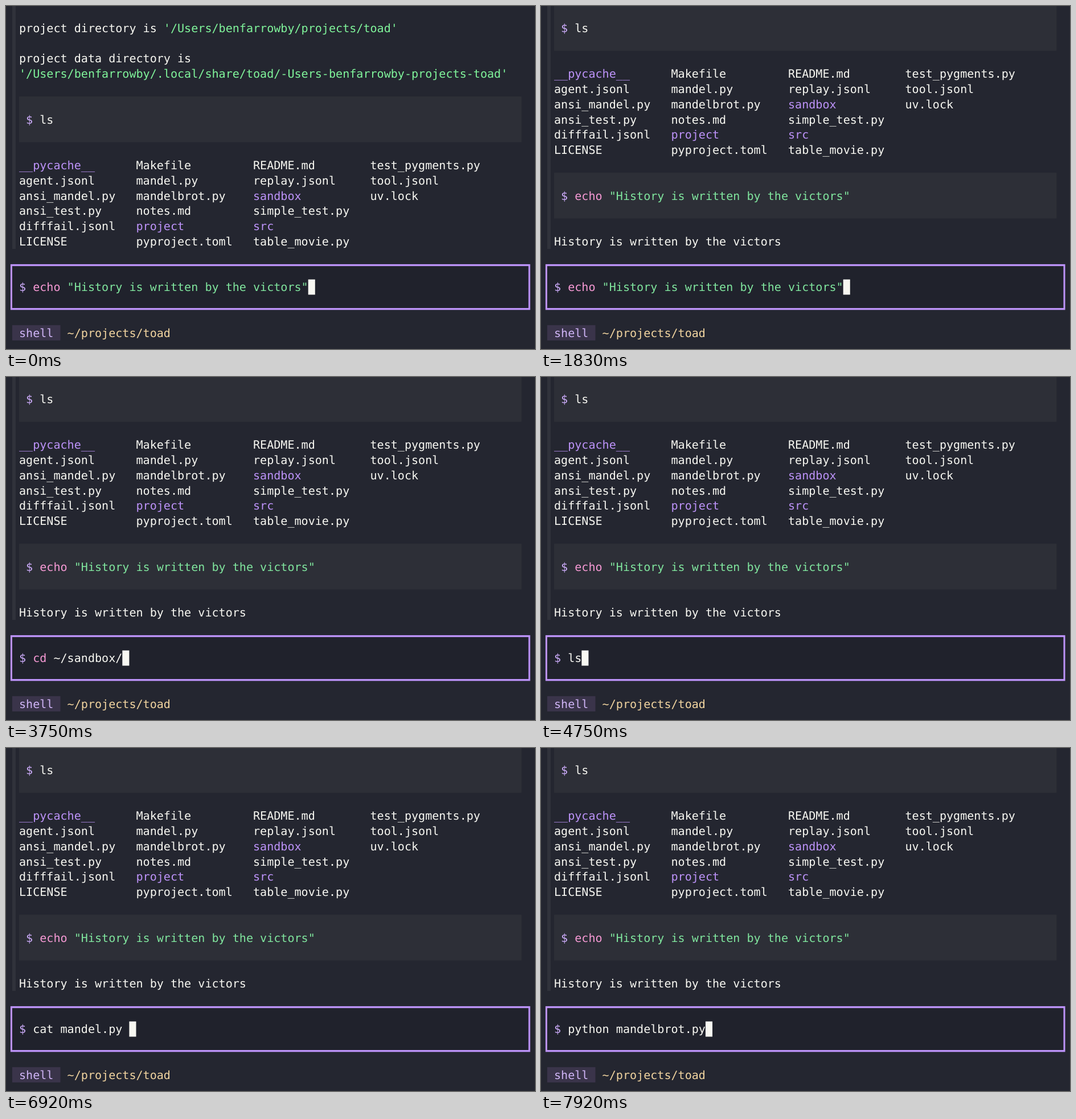
An HTML page with a canvas that plays this animation: 929 by 603 pixels, repeating every 8 s.

```html
<!DOCTYPE html>
<html lang="en">
<head>
<meta charset="utf-8">
<title>Shell history</title>
<style>
  html, body { margin: 0; width: 100%; height: 100%; overflow: hidden; background: #242630; }
  canvas { display: block; }
</style>
</head>
<body>
<canvas id="stage" width="929" height="603"></canvas>
<script>
const ctx = document.getElementById('stage').getContext('2d');
const LOOP = 8000;
const CELL = 12.088, ROW = 26.8, LEFT = 23, TOP = -1.7, BASELINE = 20.7;
const FONT = '20.08px "DejaVu Sans Mono", "Noto Sans Mono", monospace';
const C = {
  bg: '#242630', panel: '#2d2f37', bar: '#30323b', input: '#20222c',
  text: '#f8f8f2', purple: '#bd93f9', prompt: '#cdacfa', pink: '#f79ad5',
  path: '#80f59b', string: '#80e69e', yellow: '#f2d5a0', chevron: '#b9b4c8',
  tag: '#3a344a', tagText: '#d0b5f7', grey: '#7c7d82', blue: '#6474a8'
};
const USER = 'benfarrowby';
const ECHO = 'echo "History is written by the victors"';
const FIND = 'find . -name "*.py" -not -path "./sandbox*" | xargs wc -l';

const FILES = [
  ['__pycache__', 'agent.jsonl', 'ansi_mandel.py', 'ansi_test.py', 'difffail.jsonl', 'LICENSE'],
  ['Makefile', 'mandel.py', 'mandelbrot.py', 'notes.md', 'project', 'pyproject.toml'],
  ['README.md', 'replay.jsonl', 'sandbox', 'simple_test.py', 'src', 'table_movie.py'],
  ['test_pygments.py', 'tool.jsonl', 'uv.lock']
];
const FOLDERS = new Set(['__pycache__', 'project', 'sandbox', 'src']);

// Start time and prompt contents; null is the empty prompt.
const HISTORY = [
  [0, ECHO], [750, null], [1830, ECHO],
  [2670, 'python ansi_mandel.py'], [3500, 'python ansi_mandel.py '],
  [3750, 'cd ~/sandbox/'], [3920, 'ls'], [4080, 'python mandelbrot.py'],
  [4250, 'python simple_test.py'], [4500, 'ls -al'], [4580, 'cd ..'],
  [4750, 'ls'], [4830, FIND], [5000, 'python mandel.py'],
  [5170, 'ls'], [5330, 'python ansi_test.py'], [5750, 'ls'],
  [6000, 'ls -al'], [6170, 'python ansi_test.py'], [6500, 'ls'],
  [6580, 'python mandelbrot.py'], [6670, 'python ansi_mandel.py'],
  [6750, 'ls'], [6830, 'cat mandel.py'], [6920, 'cat mandel.py '],
  [7000, 'python mandel.py'], [7080, 'ls'], [7170, 'python ansi_mandel.py'],
  [7250, 'python mandelbrot.py'], [7330, 'ls'], [7500, 'python ansi_mandel.py'],
  [7580, 'python mandel.py'], [7670, 'ls'], [7920, 'python mandelbrot.py']
];
const CURSOR_OFF = [[420, 750], [2420, 2670], [3170, 3500]];

const colX = col => LEFT + col * CELL;
const rowY = row => TOP + row * ROW;

// Fills a block measured in terminal cells.
function block(col, row, cols, rows, color) {
  ctx.fillStyle = color;
  ctx.fillRect(colX(col), rowY(row), cols * CELL, rows * ROW);
}

function write(text, col, row, color) {
  ctx.fillStyle = color;
  ctx.fillText(text, colX(col), rowY(row) + BASELINE);
}

function writeCommand(command, col, row) {
  for (const { 0: part, index } of command.matchAll(/"[^"]*"|\S+/g)) {
    const color = part[0] === '"' ? C.string
      : /^(echo|cd)$/.test(part) ? C.pink : C.text;
    write(part, col + index, row, color);
  }
}

const panel = row => block(0, row, 73, 3, C.panel);

function drawLog(t) {
  const shift = t < 750 ? 0 : t < 830 ? 4 : t < 920 ? 5 : 6;
  ctx.save();
  ctx.beginPath();
  ctx.rect(0, 0, 929, rowY(16));
  ctx.clip();
  block(-1, 0, 0.5, 16, C.bar);
  // Panel backgrounds repaint one step after the text.
  if (t < 830) panel(6);
  else {
    panel(6 - shift);
    panel(17 - shift);
  }

  write('project directory is', 0, 1 - shift, C.text);
  write(`'/Users/${USER}/projects/toad'`, 21, 1 - shift, C.path);
  write('project data directory is', 0, 3 - shift, C.text);
  write(`'/Users/${USER}/.local/share/toad/-Users-${USER}-projects-toad'`, 0, 4 - shift, C.path);
  write('$', 1, 7 - shift, C.prompt);
  writeCommand('ls', 3, 7 - shift);
  FILES.forEach((names, i) => names.forEach((name, j) =>
    write(name, i * 17, 10 + j - shift, FOLDERS.has(name) ? C.purple : C.text)));
  write('$', 1, 18 - shift, C.prompt);
  writeCommand(ECHO, 3, 18 - shift);
  write('History is written by the victors', 0, 21 - shift, C.text);
  ctx.restore();
}

function drawPlaceholder() {
  ctx.strokeStyle = C.chevron;
  ctx.lineWidth = 3;
  ctx.beginPath();
  ctx.moveTo(27, 487);
  ctx.lineTo(31.5, 495);
  ctx.lineTo(27, 503);
  ctx.stroke();
  write('What would you like to do?', 2, 18, C.grey);
  for (const [key, label, col] of [['!', 'shell', 35], ['/', 'commands', 45], ['@', 'files', 58]]) {
    block(col - 0.5, 18, 2, 1, C.grey);
    write(key, col, 18, C.input);
    write(label, col + 3, 18, C.grey);
  }
}

function drawInput(t) {
  const command = HISTORY.findLast(([start]) => t >= start)[1];
  block(-1.25, 17, 75.5, 3, command === null ? C.blue : C.purple);
  block(-1, 17.125, 75, 2.75, C.input);
  if (command === null) return drawPlaceholder();
  write('$', 0, 18, C.prompt);
  writeCommand(command, 2, 18);
  if (!CURSOR_OFF.some(([from, to]) => t >= from && t < to)) {
    block(2 + command.length, 18, 1, 1, C.text);
  }
}

function drawStatus() {
  block(-1, 21, 7, 1, C.tag);
  write('shell', 0, 21, C.tagText);
  write('~/projects/toad', 7, 21, C.yellow);
}

function draw(t) {
  ctx.font = FONT;
  ctx.textRendering = 'geometricPrecision';
  ctx.fillStyle = C.bg;
  ctx.fillRect(0, 0, 929, 603);
  drawLog(t);
  drawInput(t);
  drawStatus();
}

const start = performance.now();
function tick() {
  draw((performance.now() - start) % LOOP);
  requestAnimationFrame(tick);
}
tick();
</script>
</body>
</html>
```
